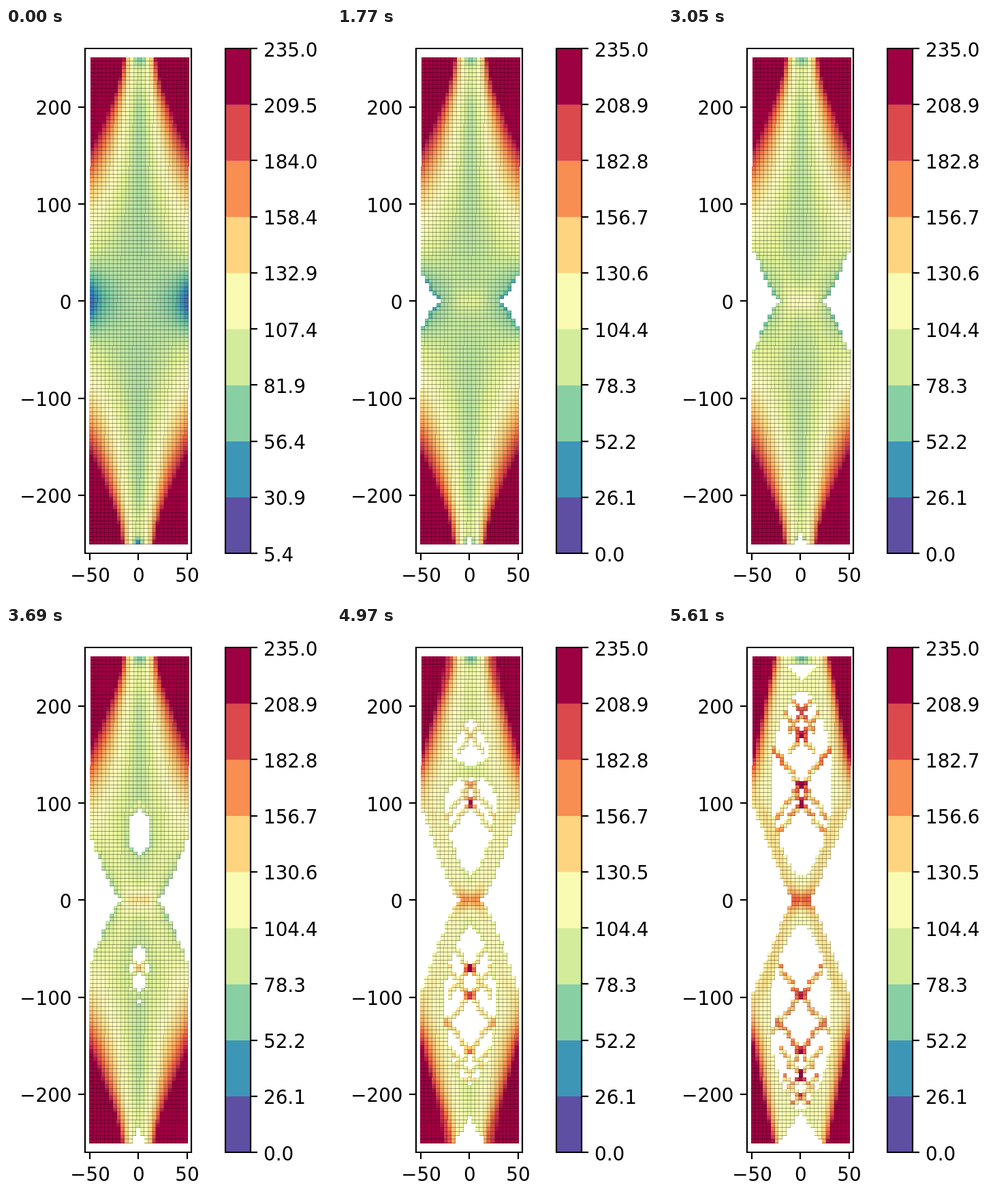
Recreate the animation shown at these times as an HTML page with a canvas. Size 477 by 837 pixels, loop 5.77 s.

```html
<!DOCTYPE html>
<html lang="en">
<head>
<meta charset="utf-8">
<title>Stress field</title>
<style>
html, body { margin: 0; width: 100%; height: 100%; overflow: hidden; background: #fff; }
canvas, svg { position: absolute; left: 0; top: 0; }
text { font: 27.78px "DejaVu Sans", sans-serif; }
.ink { fill: none; stroke: #000; stroke-width: 2.2; }
</style>
</head>
<body>
<canvas id="mesh" width="477" height="837"></canvas>
<svg id="plot" width="477" height="837" viewBox="0 0 477 837"></svg>
<script>
const FIRST = 330, STEP = 160, LAST = 34, LOOP = FIRST + LAST * STEP;
const COLS = 25, ROWS = 125, CELL_W = 5.8, CELL_H = 5.71;

// ---------- axes and colour bar ----------
const plot = document.getElementById('plot');
function add(tag, attrs, text = '') {
  const el = document.createElementNS('http://www.w3.org/2000/svg', tag);
  for (const name in attrs) el.setAttribute(name, attrs[name]);
  el.textContent = text;
  plot.append(el);
  return el;
}
const line = d => add('path', { d, class: 'ink' });
const label = (x, y, anchor, text) => add('text', { x, y, 'text-anchor': anchor }, text);
const signed = v => String(v).replace('-', '\u2212');
const baseline = y => Math.round(y + 11.5);

for (let v = -200; v <= 200; v += 100) {
  const y = 400.4 - 1.4225 * v;
  line(`M106 ${Math.round(y)}H116`);
  label(96.5, baseline(y), 'end', signed(v));
}
for (let v = -50; v <= 50; v += 50) {
  const x = 194.8 + 1.424 * v;
  line(`M${Math.floor(x)} 770V780`);
  label(x, 812, 'middle', signed(v));
}
line('M116 30H272V770H116Z');

const BANDS = ['#5e4fa2', '#3e96b7', '#88cfa4', '#d2ec9b', '#f9fbb3',
  '#fed481', '#f98e52', '#dc494c', '#9e0142'];
const BAND_H = 740 / 9;
BANDS.forEach((fill, i) => add('rect', {
  x: 322, y: 770 - (i + 1) * BAND_H, width: 37, height: BAND_H + 0.3, fill
}));
line('M322 30H359V770H322Z');
const scaleLabels = [];
for (let i = 0; i <= 9; i++) {
  const y = 770 - i * BAND_H;
  line(`M359 ${Math.round(y)}H369`);
  scaleLabels.push(label(378, baseline(y), 'start', ''));
}

// ---------- helpers ----------
const clamp = (v, lo = 0, hi = 1) => Math.min(hi, Math.max(lo, v));
const mix = (a, b, f) => a + (b - a) * f;
const bell = (d, width) => Math.exp(-((d / width) ** 2));
function noise(a, b) {
  const s = Math.sin(a * 12.9898 + b * 78.233) * 43758.5453;
  return s - Math.floor(s);
}
const SPECTRAL = [0x5e4fa2, 0x3288bd, 0x66c2a5, 0xabdda4, 0xe6f598, 0xffffbf,
  0xfee08b, 0xfdae61, 0xf46d43, 0xd53e4f, 0x9e0142];
function colour(t) {
  t = clamp(t) * 10;
  const i = Math.min(9, Math.floor(t));
  const part = s => Math.round(mix(SPECTRAL[i] >> s & 255, SPECTRAL[i + 1] >> s & 255, t - i));
  return `rgb(${part(16)},${part(8)},${part(0)})`;
}

// ---------- voids; x is the distance from the centre line ----------
// Crossed braces: arms reach `out` towards the ends and `inn` towards the waist.
const NODES = [
  { y: 118, out: 34, inn: 34 }, { y: 100, out: 6, inn: 26 },
  { y: 169, out: 22, inn: 14 }, { y: 192, out: 14, inn: 14 },
  { y: -70, out: 20, inn: 20, until: 31 }, { y: -98, out: 34, inn: 34 },
  { y: -155, out: 14, inn: 26 }, { y: -180, out: 12, inn: 22 }, { y: -202, out: 8, inn: 16 }
];
const standing = (node, k) => k <= (node.until ?? LAST);

// Step at which the truss window starts to open at height y.
function openTime(y) {
  const d = Math.abs(y) - 62;
  return 18 + (d > 0 ? 0.095 * d : -0.25 * d) + 6 * bell(y - 130, 18);
}
function inWindow(x, y, k) {
  const t = (Math.abs(y) - 26) / 189, start = openTime(y);
  if (t <= 0 || t >= 1 || k <= start) return false;
  return x < 32 * Math.sin(Math.PI * t) ** 0.6 * Math.sqrt((k - start) / (LAST - start));
}
function onBrace(x, y, k) {
  return NODES.some(node => {
    const outward = Math.abs(y) > Math.abs(node.y);
    return standing(node, k) && x <= (outward ? node.out : node.inn) &&
      Math.abs(Math.abs(y - node.y) - 1.3 * x) < 4.5;
  });
}
function inNotch(x, y, k) {
  const waist = 50 * Math.exp(-k / 21), reach = Math.min(100, 3.15 * k);
  const bend = 1 + 0.45 * Math.sin(Math.PI * k / 36);
  return x > waist && Math.abs(y) < reach * ((x - waist) / (50 - waist)) ** bend;
}
function inEnds(x, y, k) {
  const p = k / LAST;
  const foot = (2 + 20 * p ** 3) * (1 - (y + 250) / (4 + 30 * p * p));
  const head = y < 242 ? (y - 224) * 0.8 * clamp((k - 30) / 4) : 0;
  return x < foot || x < head;
}
function isVoid(x, y, k) {
  return k > 0 && (inNotch(x, y, k) || inEnds(x, y, k) ||
    (inWindow(x, y, k) && !onBrace(x, y, k)));
}

// ---------- stress ----------
function solidStress(x, y) {
  const edge = 14100 / Math.max(1, y) - 40;
  const power = 1.27 + 1.3 * (y / 250) ** 6;
  const cold = 72 * Math.exp((x - 50) / 17) * bell(y, 30);
  const v = 76 + 6 * bell(y, 40) + 18 * bell(y - 232, 24) + 160 * (x / edge) ** power - cold;
  return Math.min(280, v);
}
function trussStress(x, y) {
  const edge = 28 + 0.2 * (250 - y);
  const ends = 130 * (x / edge) ** 5 * clamp((y - 60) / 90);
  const legs = 32 * bell(x - 8 - 0.33 * y, 8) * clamp((115 - y) / 30);
  return Math.min(280, 107 + ends + legs);
}
function stress(x, y, k, open) {
  const h = Math.abs(y), p = k / LAST, late = p ** 3;
  const w = p ** (1.6 + 3.4 * clamp(h / 130));
  let v = mix(solidStress(x, h), trussStress(x, h), w);
  v += 65 * p ** 1.5 * bell(y, 11) * bell(x, 18);
  v -= (30 + 35 * late) * bell(x, 8) * bell(250 - y, 8);
  v -= 65 * (1 - p) ** 4 * bell(x, 4) * bell(250 + y, 6);
  for (const node of NODES) {
    if (!standing(node, k)) continue;
    v += 130 * clamp((k - openTime(node.y) - 1) / 4) * bell(x, 5.5) * bell(y - node.y, 5.5);
  }
  const grain = noise(x, y);
  if (inWindow(x, y, k)) v += 75 * grain * late;
  return v - 16 * open * grain * (1 - late);
}

// ---------- drawing ----------
const ctx = document.getElementById('mesh').getContext('2d');
const SIDES = [[0, 1], [0, -1], [1, 0], [-1, 0]];
const distance = c => Math.abs(c - 12) * 4;
const height = r => (62 - r) * 4;
const rowEdge = r => Math.round(43.2 + r * CELL_H);

function drawMesh(k, low, high) {
  const gone = Array.from({ length: ROWS }, (_, r) =>
    Array.from({ length: COLS }, (_, c) => isVoid(distance(c), height(r), k)));
  const across = new Path2D(), down = new Path2D();
  ctx.clearRect(0, 0, 477, 837);
  for (let r = 0; r < ROWS; r++) {
    const y = height(r), top = rowEdge(r), bottom = rowEdge(r + 1);
    const start = 195.4 + 1.1 * y / 250 - COLS / 2 * CELL_W;
    for (let c = 0; c < COLS; c++) {
      if (gone[r][c]) continue;
      const open = SIDES.filter(([i, j]) => gone[r + i]?.[c + j]).length;
      if (open === 4) continue;
      const left = Math.round(start + c * CELL_W), right = Math.round(start + (c + 1) * CELL_W);
      ctx.fillStyle = colour((stress(distance(c), y, k, open) - low) / (high - low));
      ctx.fillRect(left, top, right - left, bottom - top);
      across.rect(left, bottom - 1, right - left, 1);
      down.rect(right - 1, top, 1, bottom - top);
    }
  }
  ctx.fillStyle = 'rgba(0,0,0,.36)';
  ctx.fill(across);
  ctx.fillStyle = 'rgba(0,0,0,.24)';
  ctx.fill(down);
}

let shown = -1;
function tick() {
  const t = performance.now() % LOOP;
  const k = t < FIRST ? 0 : Math.min(LAST, 1 + Math.floor((t - FIRST) / STEP));
  if (k !== shown) {
    shown = k;
    const low = k ? 0 : 5.36;
    const high = !k ? 234.99 : k < 25 ? 235 : k < 32 ? 234.98 : 234.96;
    drawMesh(k, low, high);
    scaleLabels.forEach((el, i) => { el.textContent = mix(low, high, i / 9).toFixed(1); });
  }
  requestAnimationFrame(tick);
}
tick();
</script>
</body>
</html>
```
